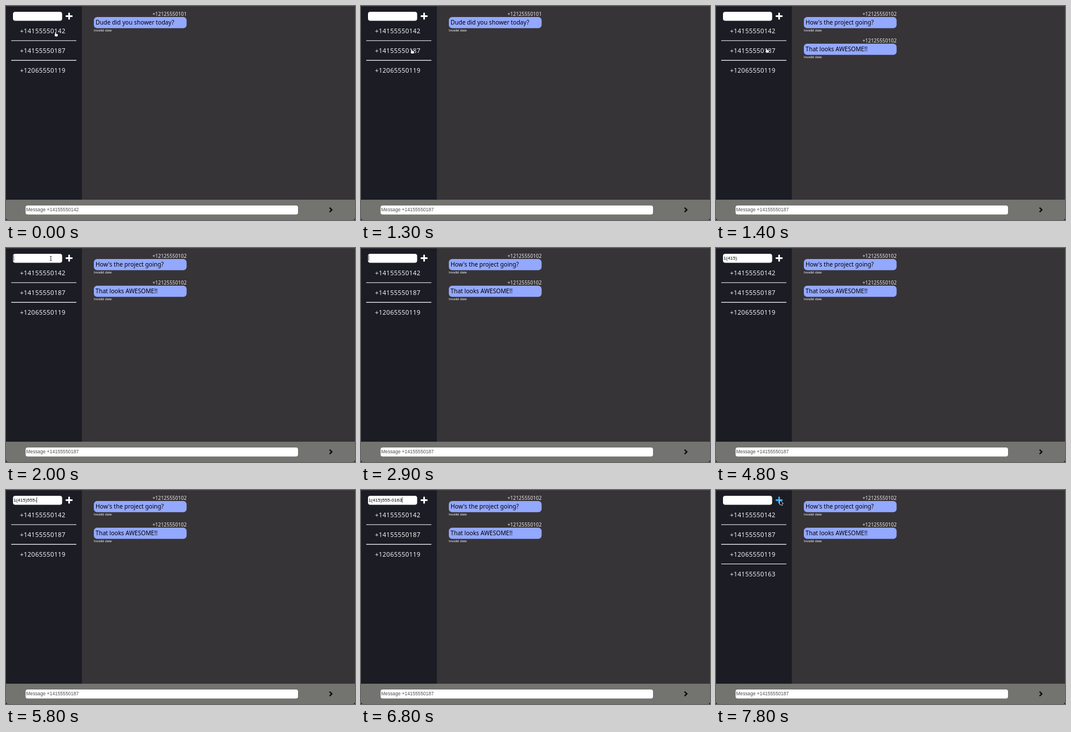
Write an HTML page with a canvas that moves like this. It is 600x369 px and loops after 8000 ms.

```html
<!DOCTYPE html>
<html lang="en">
<head>
<meta charset="utf-8">
<title>Chat demo</title>
<style>
  html, body { margin: 0; width: 100%; height: 100%; overflow: hidden; background: #000; }
  canvas { display: block; width: 600px; height: 369px; }
</style>
</head>
<body>
<canvas id="stage"></canvas>
<script>
const W = 600, H = 369, LOOP = 8000, STEP = 100;
const SIDE = 130.5, FOOT = 334, ROW = 33.9, BUBBLE = 46;
const UI = '"Noto Sans", "Open Sans", sans-serif';
const FIELD = '"Liberation Sans", Arial, sans-serif';

const canvas = document.getElementById('stage');
const ctx = canvas.getContext('2d');
const dpr = window.devicePixelRatio || 1;
canvas.width = Math.round(W * dpr);
canvas.height = Math.round(H * dpr);

const contacts = ['+14155550142', '+14155550187', '+12065550119', '+14155550163'];
const chats = [
  { from: '+12125550101', lines: ['Dude did you shower today?'] },
  { from: '+12125550102', lines: ["How's the project going?", 'That looks AWESOME!!'] }
];

const when = { pick: 1200, load: 1400, focus: 1900, hide: 2400, wake: 7200, add: 7700 };

// Bursts of typing; a backspace empties the field
const KEY_GAP = 180;
const bursts = [
  [when.hide, '1'], [2800, '\b'], [3300, '1'], [3800, '(415)'],
  [5000, '555'], [5700, '-0'], [6400, '163'], [when.add, '\b']
];

// Pointer moves: start, end, dx, dy
const home = { x: 84.5, y: 45 };
const moves = [
  [900, 1300, 2, 29.5],
  [1350, 1850, -9.5, -56.5],
  [when.wake - STEP, 7500, 33, 0]
];

const clamp = v => Math.min(1, Math.max(0, v));
const smooth = v => v * v * (3 - 2 * v);

function rect(x, y, w, h, fill, r = 0) {
  ctx.fillStyle = fill;
  ctx.beginPath();
  ctx.roundRect(x, y, w, h, r);
  ctx.fill();
}

function label(str, x, y, font, fill, align = 'left', spacing = 0) {
  ctx.font = font;
  ctx.textAlign = align;
  ctx.letterSpacing = spacing + 'px';
  ctx.fillStyle = fill;
  ctx.fillText(str, x, y);
}

function outlined(path, fill, line) {
  ctx.lineJoin = 'round';
  ctx.lineWidth = 1.2;
  ctx.strokeStyle = line;
  ctx.stroke(path);
  ctx.fillStyle = fill;
  ctx.fill(path);
}

function typing(t) {
  let text = '', last = when.focus;
  for (const [start, keys] of bursts) {
    [...keys].forEach((key, i) => {
      const at = start + i * KEY_GAP;
      if (at > t) return;
      text = key === '\b' ? '' : text + key;
      last = at;
    });
  }
  const caret = t > when.focus && t < when.add && (t - last + 220) % 1000 < 500;
  return { text, caret };
}

function pointerAt(t) {
  return moves.reduce((p, [from, to, dx, dy]) => {
    const e = smooth(clamp((t - from) / (to - from)));
    return { x: p.x + dx * e, y: p.y + dy * e };
  }, home);
}

function drawHand() {
  const hand = new Path2D();
  hand.roundRect(0, 0, 1.6, 5, .8);
  hand.roundRect(-.8, 3.3, 5.4, 4.2, 1.4);
  outlined(hand, '#fff', '#111');
}

function drawArrow() {
  outlined(new Path2D('M0 0V7.4L1.7 5.9L2.9 8.4L4.1 7.9L3 5.5H5.2Z'), '#000', '#fff');
}

function drawBeam() {
  rect(-.4, -3.5, .9, 7, '#222');
  for (const y of [-4, 3.2]) rect(-1.6, y, 3.3, .8, '#222');
}

function drawPointer(t) {
  if (t >= when.hide && t < when.wake) return;
  const { x, y } = pointerAt(t);
  ctx.save();
  ctx.translate(x, y);
  if (y < 26 && x < 96.5) drawBeam();
  else if (y > 34) drawHand();
  else drawArrow();
  ctx.restore();
}

function drawSidebar(t) {
  rect(0, 0, SIDE, FOOT, '#1c1c25');
  rect(12, 10, 84.5, 15.6, '#fff', 4);

  const { text, caret } = typing(t);
  label(text, 12.8, 20.2, '8.1px ' + FIELD, '#000');
  if (caret) rect(12.8 + ctx.measureText(text).width, 12.4, .8, 9.5, '#111');

  const plus = t >= 7500 ? '#35aef5' : '#fff';
  rect(102.5, 16.1, 12, 2.8, plus, 1);
  rect(107.1, 11.5, 2.8, 12, plus, 1);

  contacts.slice(0, t >= when.add ? 4 : 3).forEach((number, i) => {
    const y = i * ROW;
    label(number, 63.2, y + 46.8, '10.9px ' + UI, '#f2f2f4', 'center', .3);
    if (i) rect(9, y + 25.3, 112, 1.1, '#f4f4f4');
  });
}

function drawChat({ from, lines }) {
  lines.forEach((line, i) => {
    const y = i * BUBBLE;
    label(from, 310.6, y + 16.9, '8.4px ' + UI, '#f0f0f0', 'right', .12);
    rect(151, y + 19.1, 159.5, 19.1, '#93a8ff', 5.5);
    label(line, 154, y + 32.4, '500 10.15px ' + UI, '#000');
    label('Invalid date', 151, y + 43.6, '6.05px ' + FIELD, '#f0f0f0');
  });
}

function drawFooter(t) {
  rect(0, FOOT, W, H - FOOT, '#73736f');
  rect(33.7, 344, 468.3, 15.6, '#fff', 3.5);
  label('Message ' + contacts[t >= when.pick ? 1 : 0], 34.8, 354.3, '8.2px ' + FIELD, '#505050');
  ctx.strokeStyle = '#000';
  ctx.lineWidth = 2.1;
  ctx.lineJoin = 'miter';
  ctx.stroke(new Path2D('M556.3 347.8l3.9 3.7l-3.9 3.7'));
}

function draw(t) {
  ctx.setTransform(dpr, 0, 0, dpr, 0, 0);
  rect(0, 0, W, H, '#000');
  ctx.save();
  ctx.beginPath();
  ctx.roundRect(0, 0, W, H, [0, 0, 4, 4]);
  ctx.clip();
  rect(0, 0, W, H, '#373437');
  drawSidebar(t);
  drawChat(chats[t >= when.load ? 1 : 0]);
  drawFooter(t);
  rect(0, 0, W, .6, '#4c4a4e');
  drawPointer(t);
  ctx.restore();
}

const start = performance.now();
function tick() {
  const t = (performance.now() - start) % LOOP;
  draw(Math.floor(t / STEP) * STEP);
  requestAnimationFrame(tick);
}
tick();
</script>
</body>
</html>
```
